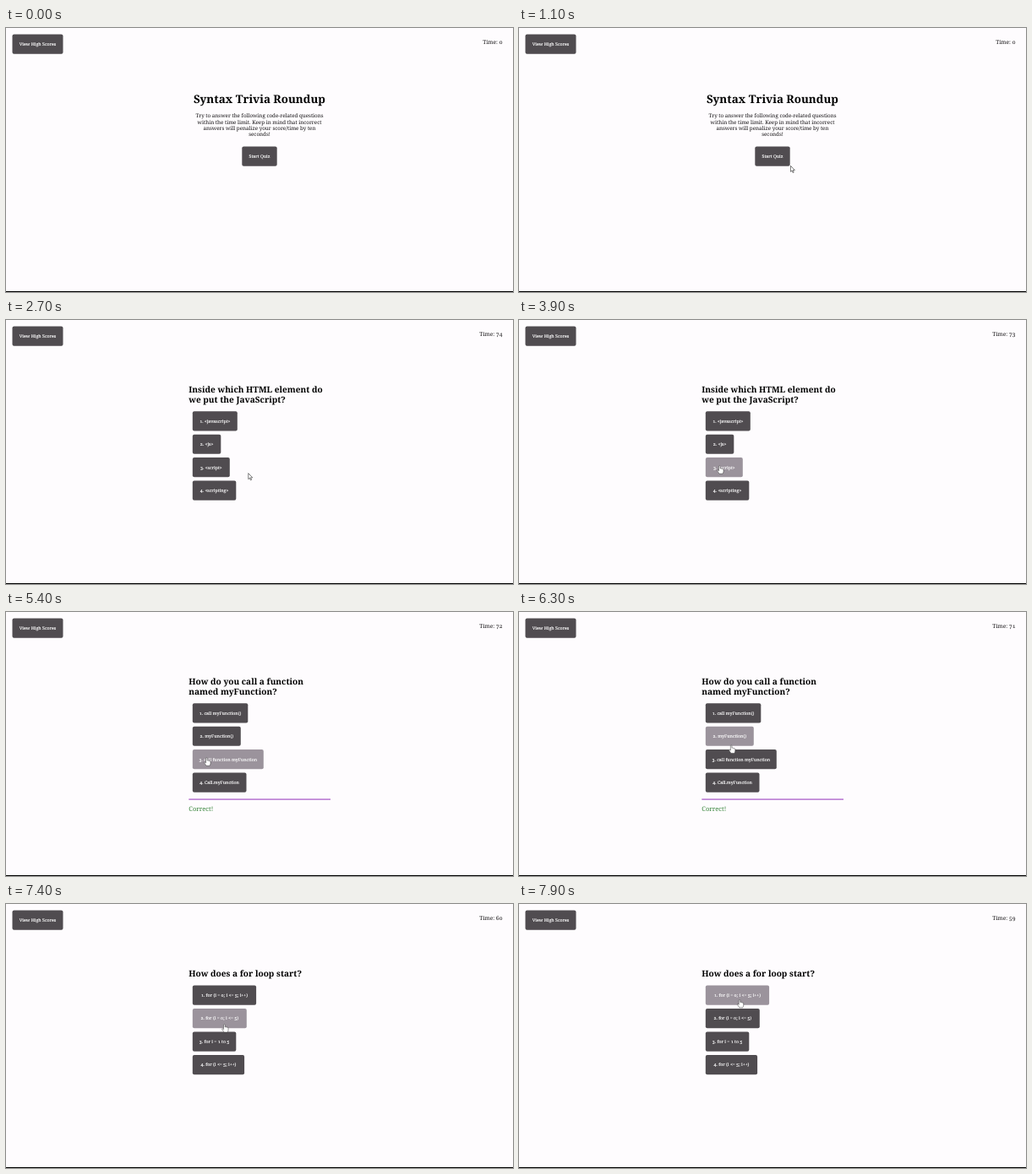
An HTML page that plays this animation: 600x313 px, repeating every 8000 ms.

```html
<!DOCTYPE html>
<html lang="en">
<head>
<meta charset="utf-8">
<title>Quiz</title>
<style>
  html, body { margin: 0; width: 100%; height: 100%; overflow: hidden; background: #fefcfe; }
  svg { display: block; width: 100%; height: 100%; }
  text {
    font-family: "Noto Serif", Georgia, serif;
    font-size: 6.25px;
    font-variant-numeric: oldstyle-nums;
    text-rendering: geometricPrecision;
    fill: #141214;
  }
  .mid { text-anchor: middle; }
  .end { text-anchor: end; }
  .clock { font-size: 6.6px; text-anchor: end; }
  .title { font-size: 13.35px; font-weight: 700; fill: #000; }
  .question { font-size: 10.1px; font-weight: 700; fill: #000; }
  .label { font-size: 5.25px; fill: #fff; stroke: #fff; stroke-width: 0.14px; text-anchor: middle; }
  .correct { font-size: 7.5px; fill: #37843a; }
  .button { fill: #504c50; }
  .button.hover { fill: #9b939c; }
</style>
</head>
<body>
<svg id="stage" viewBox="0 0 600 313" preserveAspectRatio="none">
  <rect width="600" height="313" fill="#fefcfe"/>
  <rect y="312" width="600" height="1" fill="#000"/>
</svg>
<script>
const LOOP = 8000, STEP = 100;
const stage = document.getElementById("stage");

function add(parent, tag, attrs, content) {
  const node = document.createElementNS("http://www.w3.org/2000/svg", tag);
  for (const key in attrs) node.setAttribute(key, attrs[key]);
  if (content) node.textContent = content;
  parent.appendChild(node);
  return node;
}

function addText(parent, x, y, cls, content) {
  return add(parent, "text", { x, y, class: cls }, content);
}

function addButton(parent, x, y, w, label) {
  const h = 23.2;
  const node = add(parent, "rect", { x, y, width: w, height: h, rx: 2, class: "button" });
  addText(parent, x + w / 2, y + 13.4, "label", label);
  return { node, x, y, w, h };
}

function addLines(parent, x, y, gap, cls, lines) {
  lines.forEach((line, i) => addText(parent, x, y + i * gap, cls, line));
}

function introScene() {
  const group = add(stage, "g", {});
  addText(group, 300, 88.7, "title mid", "Syntax Trivia Roundup");
  addLines(group, 300, 106.2, 7.4, "mid", [
    "Try to answer the following code-related questions",
    "within the time limit. Keep in mind that incorrect",
    "answers will penalize your score/time by ten",
    "seconds!"
  ]);
  return { group, buttons: [addButton(group, 279.3, 140.6, 41.4, "Start Quiz")] };
}

function questionScene(lines, options) {
  const group = add(stage, "g", {});
  const top = 85 + lines.length * 11.6;
  addLines(group, 216.3, 86.2, 11.6, "question", lines);
  const buttons = options.map(([label, w], i) =>
    addButton(group, 220.8, top + i * 27.45, w, `${i + 1}. ${label}`));
  return { group, buttons };
}

addButton(stage, 7.5, 7.5, 60, "View High Scores");
const clock = addText(stage, 587.5, 18.5, "clock", "Time: 0");

const scenes = [
  { from: 0, ...introScene() },
  { from: 1800, ...questionScene(
    ["Inside which HTML element do", "we put the JavaScript?"],
    [["<javascript>", 53], ["<js>", 33.5], ["<script>", 44], ["<scripting>", 51.5]]) },
  { from: 5400, ...questionScene(
    ["How do you call a function", "named myFunction?"],
    [["call myFunction()", 65.5], ["myFunction()", 57], ["call function myFunction", 84], ["Call.myFunction", 63.7]]) },
  { from: 7300, ...questionScene(
    ["How does a for loop start?"],
    [["for (i = 0; i <= 5; i++)", 75.3], ["for (i = 0; i <= 5)", 64], ["for i = 1 to 5", 51.5], ["for (i <= 5; i++)", 61.3]]) }
];

// Feedback for the first answer, shown with the second question
add(scenes[2].group, "rect", { x: 216.3, y: 221.5, width: 167.7, height: 1.2, fill: "#a552c6" });
addText(scenes[2].group, 216.3, 236.2, "correct", "Correct!");

const arrow = add(stage, "path", {
  d: "M0 0V7L1.6 5.6L2.7 8.2L3.8 7.7L2.7 5.2H4.9Z",
  fill: "#fff", stroke: "#222", "stroke-width": 0.6
});
const hand = add(stage, "path", {
  d: "M-.8-.2Q0-1.2 .8-.2V2.6Q1.6 2 2.3 2.8Q3.1 2.3 3.7 3.2Q4.7 3 4.7 4.2V6.2Q4.6 7.6 3.8 8.8H-.3Q-1.2 7.2-2.6 5.4Q-2.8 4.2-1.8 4.5L-.8 5.4Z",
  fill: "#fff", stroke: "#333", "stroke-width": 0.5
});

// Pointer path: time, x, y
const path = [
  [900, 330, 167], [1500, 297, 153], [1700, 297, 153], [2100, 286.8, 181.7],
  [3400, 286.8, 181.7], [3900, 237.3, 173.5], [5600, 237.3, 173.5],
  [6000, 244, 226], [6500, 255, 122], [6700, 257.7, 125], [6900, 257.7, 125],
  [7000, 257.7, 150.5], [7200, 257.7, 150.5], [7900, 261, 114]
];

// Seconds left: time, value
const ticks = [
  [0, 0], [1800, 75], [2700, 74], [3700, 73], [4700, 72],
  [5700, 71], [6700, 70], [7300, 60], [7700, 59]
];

function pointerAt(t) {
  const next = path.findIndex(key => key[0] > t);
  if (next < 0) return path[path.length - 1].slice(1);
  if (next === 0) return null;
  const [t0, x0, y0] = path[next - 1], [t1, x1, y1] = path[next];
  const u = (t - t0) / (t1 - t0), k = u * u * (3 - 2 * u);
  return [x0 + (x1 - x0) * k, y0 + (y1 - y0) * k];
}

function show(node, visible) {
  node.setAttribute("display", visible ? "inline" : "none");
}

function render(time) {
  const t = Math.floor((time % LOOP) / STEP) * STEP;
  const scene = scenes.filter(s => s.from <= t).pop();
  const pointer = pointerAt(t);
  let hovering = false;

  scenes.forEach(s => show(s.group, s === scene));
  clock.textContent = "Time: " + ticks.filter(k => k[0] <= t).pop()[1];

  for (const b of scene.buttons) {
    const over = !!pointer &&
      pointer[0] >= b.x && pointer[0] <= b.x + b.w &&
      pointer[1] >= b.y && pointer[1] <= b.y + b.h;
    b.node.classList.toggle("hover", over);
    hovering = hovering || over;
  }

  show(hand, hovering);
  show(arrow, pointer && !hovering);
  if (pointer) {
    const move = `translate(${pointer[0]} ${pointer[1]})`;
    hand.setAttribute("transform", move);
    arrow.setAttribute("transform", move);
  }
}

const start = performance.now();
function loop() {
  render(performance.now() - start);
  requestAnimationFrame(loop);
}
loop();
</script>
</body>
</html>
```
